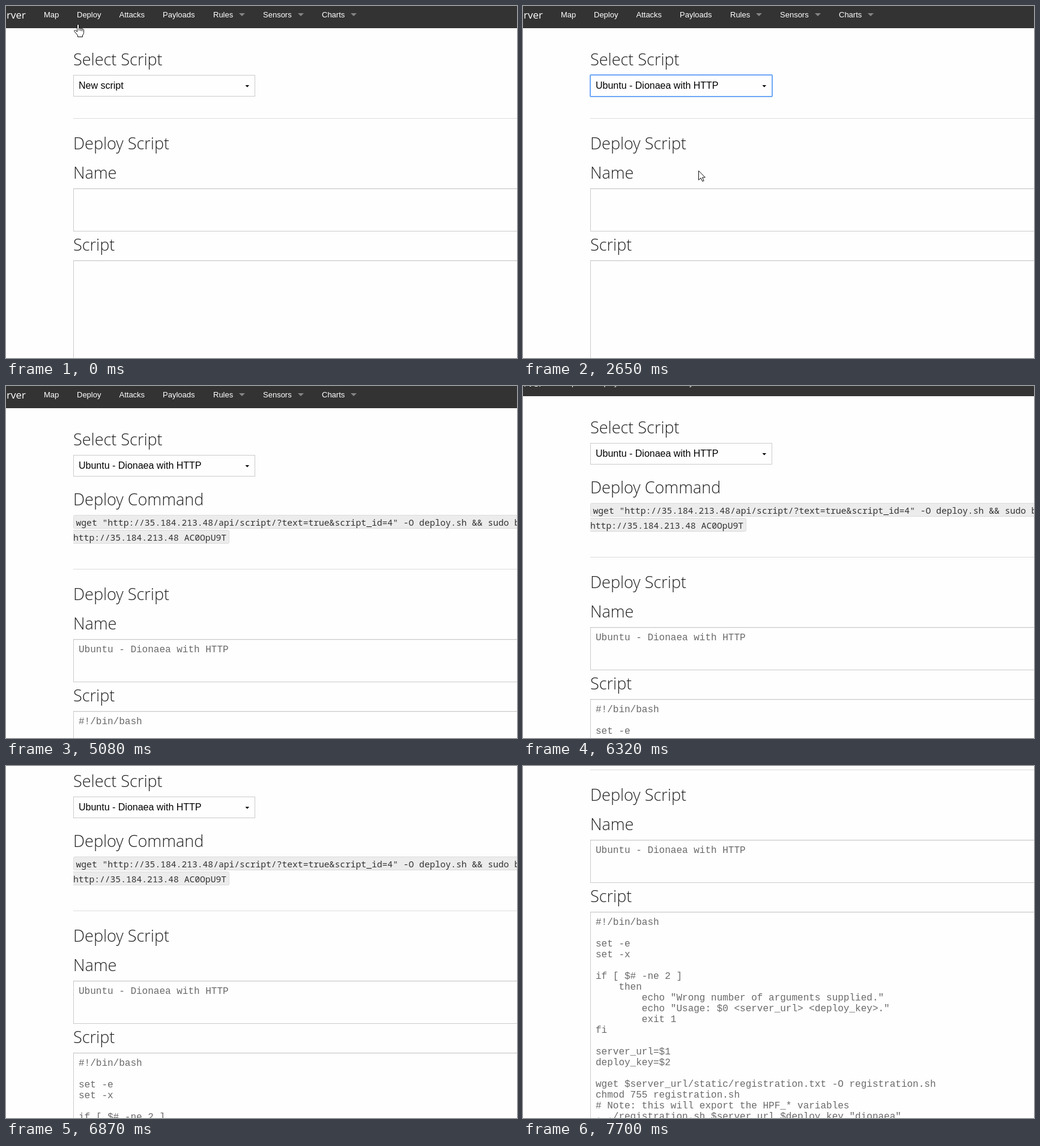
An HTML page that plays this animation: 851 px wide and 587 px high, repeating every 8000 ms.

```html
<!DOCTYPE html>
<html lang="en">
<head>
<meta charset="utf-8">
<title>Deploy page</title>
<style>
  html, body { margin: 0; width: 100%; height: 100%; overflow: hidden; background: #fefefe; }
  svg { display: block; }
  text { white-space: pre; }
  .nav { font: 13px "Liberation Sans", Arial, sans-serif; fill: #fff; }
  .brand { font: 17px "Open Sans", sans-serif; fill: #fff; text-anchor: end; }
  .head { font: 300 27px "Open Sans", sans-serif; fill: #222; }
  .value { font: 16px "Liberation Sans", Arial, sans-serif; fill: #000; }
  .cmd { font: 14.66px "Noto Sans Mono", monospace; fill: #333; }
  .mono { font: 16px "Liberation Mono", "Courier New", monospace; fill: #6a6a6a; }
  .box { fill: #fefefe; stroke: #ccc; }
  .shade { stroke: #efefef; }
  .rule { stroke: #ddd; }
  .code { fill: #ececec; stroke: #dcdcdc; }
</style>
</head>
<body>
<svg width="851" height="587" viewBox="0 0 851 587">
  <g id="page">
    <rect y="-8" width="851" height="45" fill="#333"/>
    <text class="brand" x="33" y="21">Server</text>
    <g id="nav" class="nav"></g>

    <text class="head" x="112" y="99">Select Script</text>
    <rect class="box" x="112.5" y="115.5" width="302" height="35"/>
    <rect id="ring" x="112" y="115" width="303" height="36" rx="1" fill="none" stroke="#6fa8f5" stroke-width="2"/>
    <text id="choice" class="value" x="121" y="138"></text>
    <path d="M398.5 132h6.6l-3.3 3.6z"/>

    <g id="command">
      <text class="head" x="112" y="199">Deploy Command</text>
      <rect class="code" x="112.5" y="215.5" width="760" height="22" rx="2"/>
      <path class="code" d="M112 240.5H369.5a2 2 0 0 1 2 2V260.5a2 2 0 0 1 -2 2H112"/>
      <text class="cmd" x="116.5" y="233">wget "http://35.184.213.48/api/script/?text=true&amp;script_id=4" -O deploy.sh &amp;&amp; sudo bash deploy.sh</text>
      <text class="cmd" x="112" y="258">http://35.184.213.48 AC0OpU9T</text>
    </g>

    <g id="form">
      <path class="rule" d="M112 187.5H851"/>
      <text class="head" x="112" y="239">Deploy Script</text>
      <text class="head" x="112" y="288">Name</text>
      <rect class="box" x="112.5" y="304.5" width="800" height="71"/>
      <path class="shade" d="M113 305.5H851"/>
      <text class="head" x="112" y="408">Script</text>
      <rect class="box" x="112.5" y="424.5" width="800" height="900"/>
      <path class="shade" d="M113 425.5H851"/>
      <g id="filled" class="mono"></g>
    </g>
  </g>

  <g id="arrow" fill="#fff" stroke="#111">
    <path d="M.5 .8V16.2L4.2 12.8L6.8 18.4L9.2 17.4L6.7 11.9H11.4Z"/>
  </g>
  <g id="hand" fill="#fff" stroke="#111">
    <path d="M5.5 13V2Q5.5 .5 7 .5T8.5 2V7.5Q8.7 6.2 10 6.4T11.3 8Q11.6 7 12.7 7.2T13.8 8.8Q14.2 8 15.3 8.4T16.5 10V14.5Q16.5 16.5 14.5 19V21.5H6.5V19L1.2 12.7Q.3 11.3 1.2 10.6T3.3 11Z"/>
    <path d="M8.5 7V11M11.3 8V11.5M13.8 9V12" fill="none"/>
  </g>
  <g id="beam" fill="none" stroke="#111">
    <path d="M0 .5H3M4 .5H7M3.5 1V15M0 15.5H3M4 15.5H7"/>
  </g>
</svg>
<script>
const LOOP = 8000;
const $ = id => document.getElementById(id);
const NS = "http://www.w3.org/2000/svg";

function add(parent, tag, attrs, text) {
  const node = document.createElementNS(NS, tag);
  for (const key in attrs) node.setAttribute(key, attrs[key]);
  if (text) node.textContent = text;
  parent.appendChild(node);
}

const links = [["Map", 63], ["Deploy", 118], ["Attacks", 188.5], ["Payloads", 261],
  ["Rules", 345, 388], ["Sensors", 428, 486], ["Charts", 526, 574]];
for (const [label, x, caret] of links) {
  add($("nav"), "text", { x, y: 19 }, label);
  if (caret) add($("nav"), "path", { d: `M${caret} 12h10l-5 5z`, fill: "#858585" });
}

const scriptName = "Ubuntu - Dionaea with HTTP";
const script = `#!/bin/bash

set -e
set -x

if [ $# -ne 2 ]
    then
        echo "Wrong number of arguments supplied."
        echo "Usage: $0 <server_url> <deploy_key>."
        exit 1
fi

server_url=$1
deploy_key=$2

wget $server_url/static/registration.txt -O registration.sh
chmod 755 registration.sh
# Note: this will export the HPF_* variables
. ./registration.sh $server_url $deploy_key "dionaea"`;
add($("filled"), "text", { x: 121, y: 326 }, scriptName);
script.split("\n").forEach((line, i) =>
  add($("filled"), "text", { x: 121, y: 446 + 18 * i }, line));

const pointer = [
  [0, "hand", 113, 30], [280, "hand", 139, 35], [430, "arrow", 196, 51],
  [560, "arrow", 263, 74], [840, "arrow", 400, 158], [990, "arrow", 463, 184],
  [1270, "beam", 689, 432], [1400, "beam", 702, 454], [1540, "beam", 708, 474],
  [1660, ""],
  [2650, "arrow", 292, 274], [3080, "arrow", 292, 276], [3350, "arrow", 373, 317],
  [3510, "arrow", 402, 329], [3810, "arrow", 576, 340], [3960, "arrow", 672, 379],
  [4270, "beam", 732, 441], [4420, "beam", 766, 471], [4570, "arrow", 768, 500],
  [4700, "arrow", 768, 528], [4820, "beam", 767, 551], [4960, "beam", 769, 567],
  [5080, ""]
];
// [time, scroll offset]
const scroll = [[0, 0], [6320, 20], [6450, 46], [6590, 60], [6870, 64],
  [7020, 108], [7140, 143], [7550, 230], [7700, 299]];

const at = (steps, t) => steps.findLast(step => step[0] <= t);
const show = (id, on) => $(id).setAttribute("visibility", on ? "visible" : "hidden");
const move = (id, x, y) => $(id).setAttribute("transform", `translate(${x} ${y})`);

function draw(t) {
  const chosen = t >= 2650, loaded = t >= 2800;
  $("choice").textContent = chosen ? scriptName : "New script";
  show("ring", chosen && !loaded);
  show("command", loaded);
  show("filled", loaded);
  move("form", 0, loaded ? 118 : 0);
  move("page", 0, -at(scroll, t)[1]);

  const [, shape, x, y] = at(pointer, t);
  for (const id of ["arrow", "hand", "beam"]) show(id, id === shape);
  if (shape) move(shape, x, y);
}

const start = performance.now();
function tick() {
  draw((performance.now() - start) % LOOP);
  requestAnimationFrame(tick);
}
tick();
</script>
</body>
</html>
```
